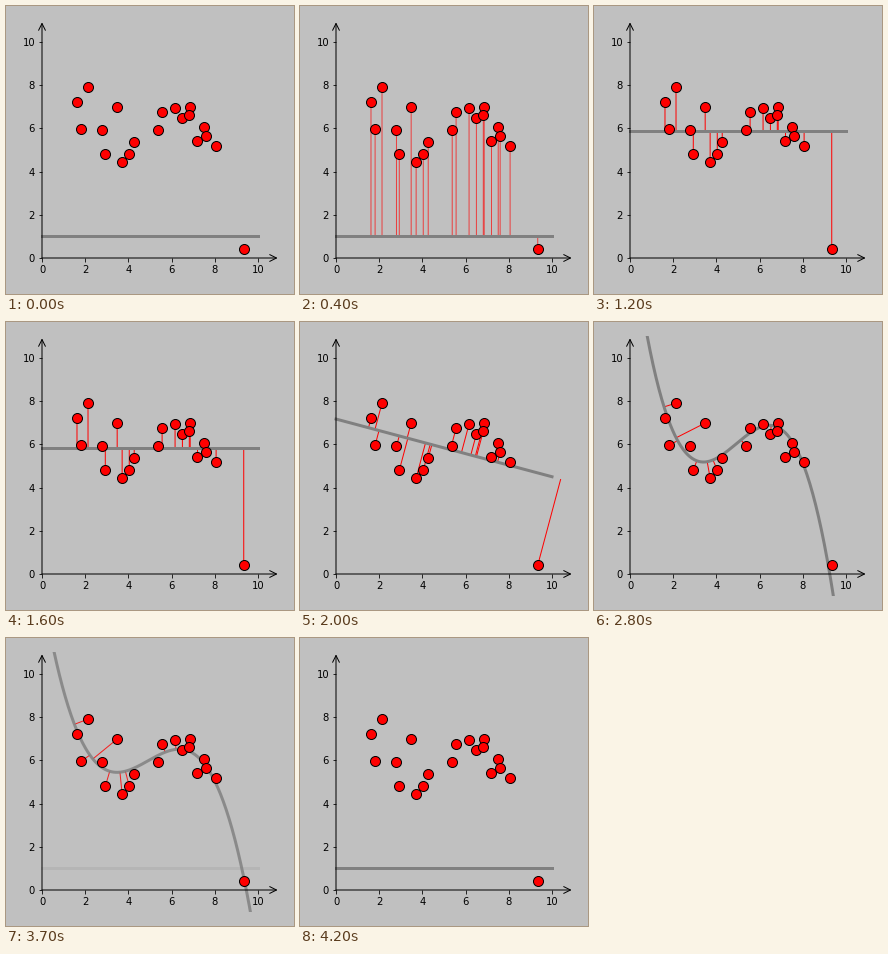
Write a matplotlib script that moves like this. It is 288 px wide and 288 px high and loops after 4.4 s.

```python
import numpy as np
import matplotlib.pyplot as plt
from matplotlib.animation import FuncAnimation
from matplotlib.collections import LineCollection

FRAMES, STEP = 44, 100
FADE = 6  # frames per fade
LEVEL, TILT, BEND, RESET = 9, 17, 27, 37  # first frame of each stage

# the measured sample that all curves are fitted to
DATA = np.array([
    (1.62, 7.20), (1.81, 5.96), (2.13, 7.91), (2.80, 5.91), (2.93, 4.80),
    (3.48, 6.99), (3.71, 4.44), (4.04, 4.80), (4.27, 5.36), (5.38, 5.91),
    (5.56, 6.75), (6.16, 6.94), (6.50, 6.48), (6.86, 6.99), (6.82, 6.62),
    (7.19, 5.42), (7.51, 6.05), (7.60, 5.64), (8.06, 5.18), (9.34, 0.41)])
MID = DATA.mean(axis=0)
MEDIAN = np.median(DATA[:, 1])

XS = np.linspace(0, 10, 300)
DENSE = np.linspace(-1, 12, 6001)


def straight(y, slope=0):
    """Line with height y at the mean x."""
    return lambda x: y + slope * (x - MID[0])


def cubic(valley, peak):
    """Cubic with the given turning points."""
    def f(x):
        s = (x - valley[0]) / (peak[0] - valley[0])
        return valley[1] + (peak[1] - valley[1]) * s * s * (3 - 2 * s)
    return f


def settle(first, last, rate, k):
    """Approach last from first, a constant share of the rest per step."""
    return last + (first - last) * rate ** k


def fit(n):
    """Curve at frame n."""
    if n < LEVEL:
        return straight(1)
    if n < TILT:
        return straight(settle(MEDIAN, MID[1], 0.85, n - LEVEL))
    if n < BEND:
        return straight(MID[1], settle(-0.37, -0.26, 0.4, min(n, 24) - TILT))
    k = min(n, 34) - BEND
    valley = settle(np.array([3.35, 5.00]), np.array([3.48, 5.46]), 0.6, k)
    peak = settle(np.array([6.53, 7.14]), np.array([6.34, 6.50]), 0.6, k)
    return cubic(valley, peak)


def feet(f):
    """Closest curve point for every data point."""
    y = f(DENSE)
    d = (DENSE - DATA[:, :1]) ** 2 + (y - DATA[:, 1:]) ** 2
    i = d.argmin(axis=1)
    return np.c_[DENSE[i], y[i]]


fig = plt.figure(figsize=(4, 4), dpi=72, facecolor="silver")
ax = fig.add_axes([0.05, 0.05, 0.9, 0.9], facecolor="none")
ticks = range(0, 11, 2)
ax.set(xlim=(-1, 11), ylim=(-1, 11), xticks=ticks, yticks=ticks)
for side in ("left", "bottom"):
    ax.spines[side].set_position("zero")
for spine in ax.spines.values():
    spine.set_visible(False)
for tip in ((11, 0), (0, 11)):
    ax.annotate("", xy=tip, xytext=(0, 0), zorder=3.5,
                arrowprops=dict(arrowstyle="->", lw=1, mutation_scale=17,
                                shrinkA=0, shrinkB=2, zorder=3.5))

residuals = LineCollection([], colors="red", linewidths=1, zorder=2)
ax.add_collection(residuals, autolim=False)
base, = ax.plot([0, 10], [1, 1], color="gray", lw=3, zorder=3)
curve, = ax.plot([], [], color="gray", lw=3, zorder=3)
ax.plot(*DATA.T, "o", color="red", mec="black", ms=10, mew=1, zorder=4)


def draw(n):
    f = fit(n)
    xs = XS if n >= BEND else XS[[0, -1]]
    curve.set_data(xs, f(xs))
    residuals.set_segments(np.stack([DATA, feet(f)], axis=1))

    fade_in = min(n / FADE, 1)
    fade_out = np.clip((n - RESET + 1) / FADE, 0, 1)
    residuals.set_alpha(fade_in * (1 - fade_out))
    curve.set_alpha(1 - fade_out)
    base.set_alpha(fade_out)
    return residuals, curve, base


anim = FuncAnimation(fig, draw, frames=FRAMES, interval=STEP, repeat=True, repeat_delay=0)
plt.show()
```
